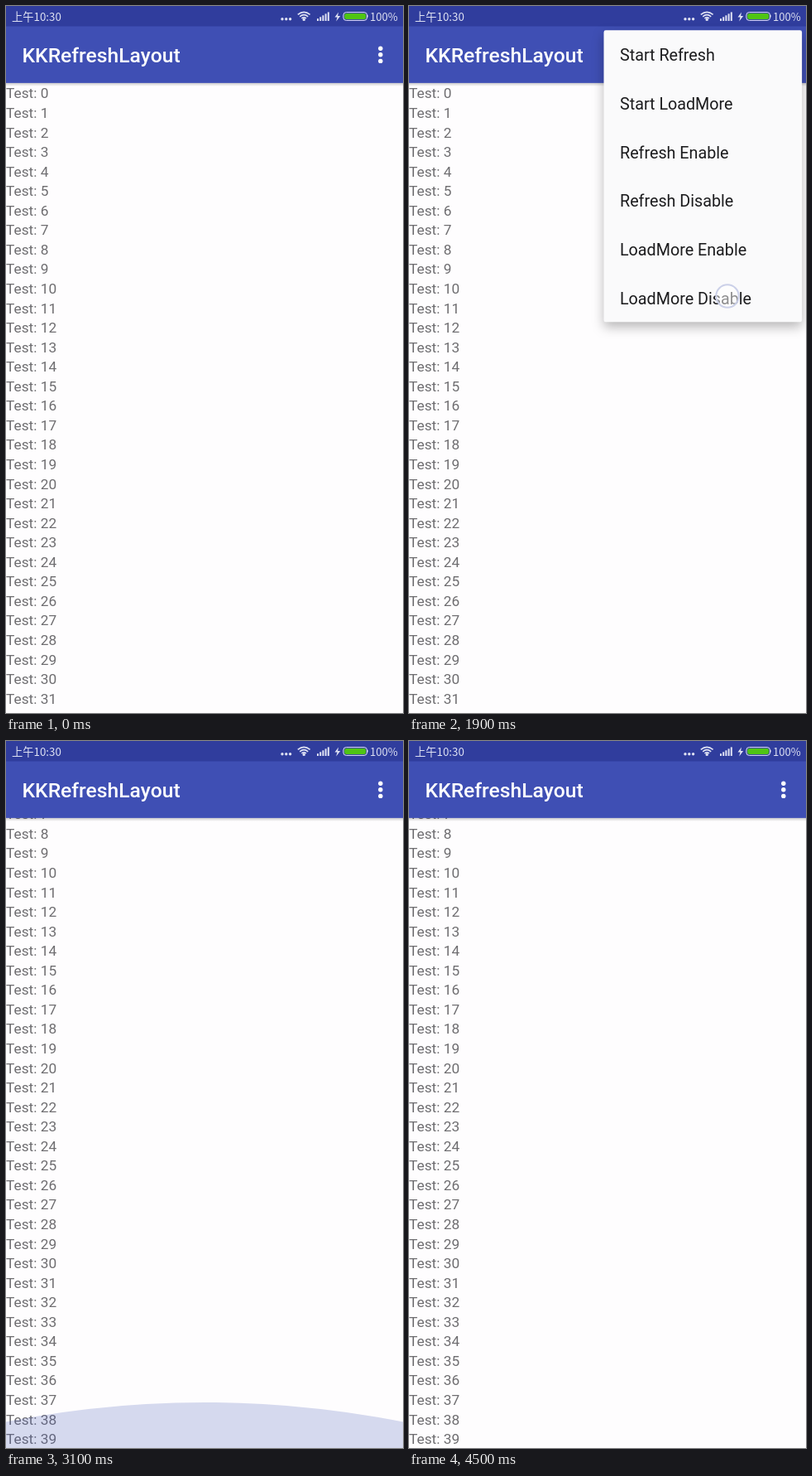
These frames come from a looping animation (480 px wide and 853 px high, 4600 ms). An HTML page:

```html
<!DOCTYPE html>
<html lang="zh">
<head>
<meta charset="utf-8">
<title>KKRefreshLayout</title>
<style>
  html, body { margin: 0; width: 100%; height: 100%; overflow: hidden; background: #fefdfe; }
  svg { display: block; width: 480px; height: 853px; font-family: Roboto, sans-serif; }
  #rows { font-size: 17.3px; fill: #6e6d70; }
  #footer { font: 14.67px "Noto Sans CJK SC", "Noto Sans CJK", sans-serif; fill: #6b6a6d; text-anchor: middle; }
  #title { font-size: 24.7px; font-weight: 500; fill: #fff; }
  .status { font: 13.3px "Noto Sans CJK SC", "Noto Sans CJK", sans-serif; fill: #e0e3f3; }
  #items { font-size: 19.73px; fill: #1c1c1e; }
  #panel { filter: drop-shadow(0 6px 7px rgba(0, 0, 0, .28)); }
</style>
</head>
<body>
<svg viewBox="0 0 480 853">
  <defs>
    <linearGradient id="shade" x2="0" y2="1">
      <stop stop-color="#000" stop-opacity=".2"/>
      <stop offset="1" stop-color="#000" stop-opacity="0"/>
    </linearGradient>
    <clipPath id="lastItem"><rect x="235.5" y="322.6" width="239.6" height="58.7"/></clipPath>
  </defs>
  <rect width="480" height="853" fill="#fefdfe"/>
  <g id="list">
    <g id="rows"></g>
    <text id="footer" x="240" y="1058.4">没有更多了</text>
  </g>
  <ellipse id="glow" cx="240" rx="720" fill="#3f51b5"/>

  <rect y="92.9" width="480" height="4" fill="url(#shade)"/>
  <rect width="480" height="92.9" fill="#3f4fb4"/>
  <rect width="480" height="24.5" fill="#303d9d"/>
  <text class="status" x="7" y="17.6">上午10:30</text>
  <text class="status" x="440" y="17.6" style="font-size: 13px">100%</text>
  <g id="icons" fill="#dfe2f3">
    <circle cx="360.2" cy="16.4" r="1.7"/>
    <path d="M352.8 10.4Q360.2 4.2 367.6 10.4M355.2 12.8Q360.2 8.6 365.2 12.8M357.4 15Q360.2 12.6 363 15"
      fill="none" stroke="#dfe2f3" stroke-width="1.6"/>
    <path d="M402 7.5l-4.5 6h3l-1.3 5 5-6.4h-3.1z"/>
    <path d="M437 10.2q1.8 2 0 4.2z"/>
  </g>
  <rect x="407.9" y="7.6" width="28.6" height="9.8" rx="3.4" fill="#303d9d" stroke="#dfe2f3"/>
  <rect x="409.2" y="8.9" width="26" height="7.2" rx="2.3" fill="#4fc414"/>
  <text id="title" x="19.56" y="68.3">KKRefreshLayout</text>
  <circle id="buttonRipple" cx="453" cy="59" r="24" fill="#fff"/>
  <g id="overflow" fill="#fff"></g>

  <g id="menu">
    <rect id="panel" x="235.5" y="29.3" width="239.6" height="352" rx="2.4"/>
    <circle id="itemRipple" cx="385" cy="350" fill-opacity=".06" clip-path="url(#lastItem)"/>
    <g id="items"></g>
  </g>
  <circle id="touch" r="13.7" fill="#fff" fill-opacity=".5" stroke="#cbd0e8" stroke-width="2"/>
</svg>
<script>
const LOOP = 4600, STEP = 100;
const ROW = 53 / 2.25, ITEM = 352 / 6;
const BOTTOM = 181.9, PULL = 40;
const $ = id => document.getElementById(id);

function set(node, attrs) {
  for (const name in attrs) node.setAttribute(name, attrs[name]);
}

function add(parent, tag, attrs, label = '') {
  const node = document.createElementNS('http://www.w3.org/2000/svg', tag);
  set(node, attrs);
  node.textContent = label;
  $(parent).append(node);
}

for (let i = 0; i < 40; i++) add('rows', 'text', { x: 0, y: 111.4 + i * ROW }, 'Test: ' + i);
['Start Refresh', 'Start LoadMore', 'Refresh Enable', 'Refresh Disable', 'LoadMore Enable', 'LoadMore Disable']
  .forEach((label, i) => add('items', 'text', { x: 255, y: 66.2 + i * ITEM }, label));
for (let i = 0; i < 3; i++) {
  add('icons', 'circle', { cx: 334 + i * 4.8, cy: 15.8, r: 1.7 });
  add('overflow', 'circle', { cx: 452.8, cy: 51.2 + i * 7.6, r: 2.7 });
}
for (let i = 0; i < 5; i++) {
  const height = 2.8 + i * 1.95;
  add('icons', 'rect', { x: 376 + i * 3.2, y: 18 - height, width: 2, height });
}

const progress = (t, start, duration) => Math.min(1, Math.max(0, (t - start) / duration));
const easeOut = p => 1 - (1 - p) ** 2;
const easeInOut = p => p * p * (3 - 2 * p);

const gestures = [
  { start: 900, duration: 100, x: 453, y: 62, dx: 0, dy: 0 },
  { start: 1900, duration: 100, x: 385, y: 350, dx: 0, dy: 0 },
  { start: 2700, duration: 100, x: 289, y: 616.7, dx: 4, dy: -77 },
  { start: 3300, duration: 700, x: 292, y: 560, dx: 14, dy: -175.5 }
];

function draw(t) {
  const fling = easeInOut(progress(t, 2600, 500));
  const pull = easeOut(progress(t, 3300, 700)) - easeOut(progress(t, 4000, 500));
  set($('list'), { transform: `translate(0 ${-BOTTOM * fling - PULL * pull})` });

  // Edge glow: a wide arc that swells when the fling hits the end, then recedes
  const glow = progress(t, 2900, 200) * (1 - progress(t, 3100, 600)) ** 2;
  const stretch = .57 * glow;
  set($('glow'), { cy: 853 + 623.5 * stretch, ry: 720 * stretch, opacity: .21 * glow });

  // The panel's own shadow darkens it while it is translucent
  const shown = progress(t, 1000, 200) - progress(t, 2100, 180);
  const gray = Math.round(192 + 58 * shown);
  set($('menu'), { opacity: shown });
  set($('panel'), { fill: `rgb(${gray},${gray},${gray + 1})` });
  set($('buttonRipple'), { opacity: .15 * (progress(t, 900, 100) - progress(t, 1000, 200)) });
  set($('itemRipple'), { r: 96 * easeOut(progress(t, 1900, 300)) });

  const touch = gestures.find(g => t >= g.start && t <= g.start + g.duration);
  set($('touch'), { visibility: touch ? 'visible' : 'hidden' });
  if (touch) {
    const p = progress(t, touch.start, touch.duration);
    set($('touch'), { cx: touch.x + touch.dx * p, cy: touch.y + touch.dy * p });
  }
}

const began = performance.now();
function frame() {
  const t = (performance.now() - began) % LOOP;
  draw(Math.floor(t / STEP) * STEP);
  requestAnimationFrame(frame);
}
frame();
</script>
</body>
</html>
```
